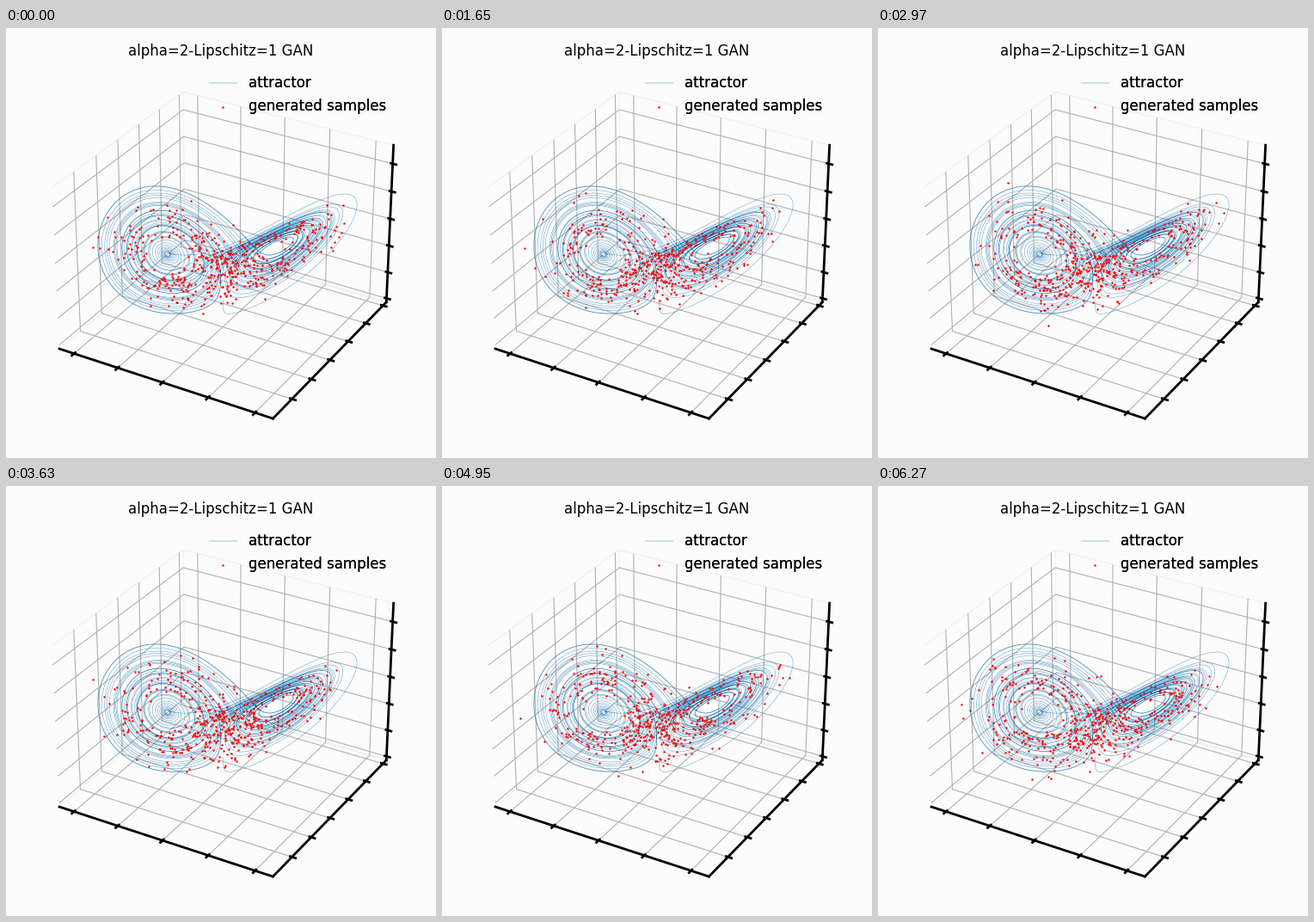
Animation of 500 by 500 pixels, one loop 6.6 s. Source, as a matplotlib script:

```python
import numpy as np
import matplotlib.pyplot as plt
from matplotlib.animation import FuncAnimation
from matplotlib.lines import Line2D

SIZE = 500
FRAMES, INTERVAL = 20, 330
SAMPLES = 500
S, R, B = 10.0, 28.0, 2.667
BACK = "#fcfcfc"
BLUE = "#1f77b4"

plt.rcParams.update({
    "font.family": "DejaVu Sans",
    "font.size": 12,
    "axes.linewidth": 2,
    "xtick.major.width": 2,
    "ytick.major.width": 2,
    "grid.color": "#b0b0b0",
    "grid.linewidth": 0.8,
})


def lorenz(start, steps, dt=0.005):
    """Euler path of the Lorenz system, shape (steps, 3)."""
    path = np.empty((steps, 3))
    x, y, z = start
    for i in range(steps):
        path[i] = x, y, z
        x, y, z = (x + dt * S * (y - x),
                   y + dt * (x * (R - z) - y),
                   z + dt * (x * y - B * z))
    return path


orbit = lorenz((0.010, 0.021, 9.0), 60000)
curve = orbit[:10000]

# samples avoid the still centres of the two lobes
c = np.sqrt(B * (R - 1))
centre = np.sign(orbit[:, :1]) * (c, c, 0) + (0, 0, R - 1)
pool = orbit[np.linalg.norm(orbit - centre, axis=1) > 6]


def draw_samples(seed):
    """Noisy points picked along the orbit, slightly flattened in z."""
    rng = np.random.default_rng(seed)
    pts = pool[rng.integers(len(pool), size=SAMPLES)]
    pts = pts + 0.6 * rng.standard_t(6, size=pts.shape)
    pts[:, 2] = 21 + 0.93 * (pts[:, 2] - 21)
    return pts.T


fig = plt.figure(figsize=(SIZE / 100, SIZE / 100), dpi=100, facecolor=BACK)
ax = fig.add_axes([28.7 / SIZE, 18 / SIZE, 442 / SIZE, 442 / SIZE],
                  projection="3d", facecolor="none")
ax.view_init(elev=30, azim=-60)

ax.plot(*curve.T, color=BLUE, lw=0.25, zorder=2)
dots, = ax.plot([], [], [], "r.", ms=1.5, zorder=5)

ax.set(xlim=(-23.4, 23.75), ylim=(-29.6, 32.0), zlim=(-1.45, 56.6),
       xticks=range(-20, 21, 10), yticks=range(-20, 31, 10),
       zticks=range(0, 51, 10),
       xticklabels=[], yticklabels=[], zticklabels=[])
for axis in (ax.xaxis, ax.yaxis, ax.zaxis):
    axis.pane.set_fill(False)
    axis.pane.set_edgecolor("#eaeaea")


def label(x, y, text, **kw):
    fig.text(x / SIZE, 1 - y / SIZE, text, va="baseline", **kw)


def key(xs, y, **kw):
    fig.add_artist(Line2D([x / SIZE for x in xs], [1 - y / SIZE] * len(xs), **kw))


label(249.5, 31.5, "alpha=2-Lipschitz=1 GAN", ha="center")
key((236, 269), 64, color=BLUE, lw=0.3)
key((252,), 91.5, color="r", marker=".", ms=1.5, ls="none")
# the legend text is laid down twice, which makes it a little heavier
for _ in range(2):
    label(282, 69, "attractor")
    label(282, 96, "generated samples")


def update(i):
    dots.set_data_3d(*draw_samples(100 + i))
    return dots,


anim = FuncAnimation(fig, update, frames=FRAMES, interval=INTERVAL,
                     init_func=lambda: update(0), repeat=True,
                     repeat_delay=0, blit=False)
plt.show()
```
